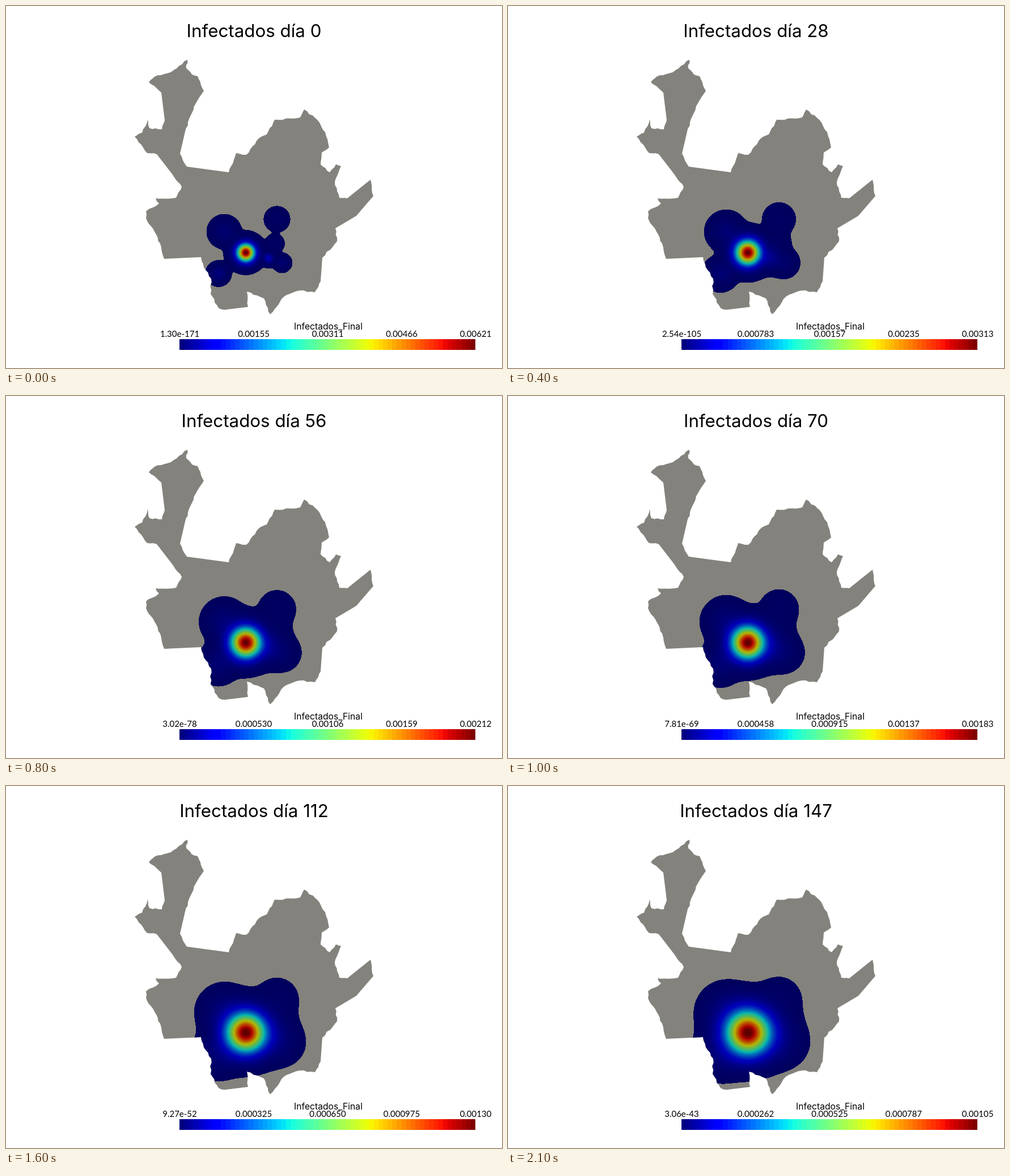
Write an HTML page with a canvas that moves like this. It is 875 by 640 pixels and loops after 2.2 s.

```html
<!DOCTYPE html>
<html lang="es">
<head>
<meta charset="utf-8">
<title>Infectados</title>
<style>
  html, body { margin: 0; width: 100%; height: 100%; overflow: hidden; background: #fff; }
  svg, canvas { position: absolute; left: 0; top: 0; display: block; }
  text { text-anchor: middle; fill: #000; font-family: Inter, sans-serif; }
  #title { font-size: 31.3px; }
  #legend { font-size: 15.7px; }
  .label { font-family: Lato, sans-serif; font-size: 15px; }
</style>
</head>
<body>
<svg id="stage" width="875" height="640" viewBox="0 0 875 640">
  <path id="region" fill="#84827c"/>
  <g id="bar" shape-rendering="crispEdges"></g>
  <text id="title" x="437.5" y="55"></text>
  <text id="legend" x="568.5" y="572">Infectados_Final</text>
</svg>
<canvas id="spread" width="875" height="640"></canvas>
<script>
const STEP_MS = 100, STEPS = 22, DAYS_PER_STEP = 7;
const BAR = { x: 306, y: 589, width: 522, height: 19, bands: 64 };
const AREA = { x: 315, y: 320, width: 235, height: 225 };
const SHADE = 0.72;          // surface lighting on the map
const DIFFUSION = 3.35;      // variance gained per day

// Main corners of the border; the short stretches between them are roughened.
const corners = `320,95 318,110 328,121 338,124 349,150 335,172 325,195 316,222 307,261 319,284
  393,294 406,260 424,263 446,234 460,227 474,201 508,199 519,197 526,183 550,202 563,223 570,250
  557,259 555,280 571,294 582,280 591,283 580,311 588,339 602,340 643,307 648,336 618,371 581,393
  584,416 558,445 555,487 545,506 518,503 490,514 466,545 455,517 425,505 427,532 386,537 375,534
  361,509 362,482 349,462 344,444 279,447 272,420 262,399 247,375 247,363 270,349 264,340 300,339
  310,320 293,297 266,262 249,260 227,231 240,224 250,200 253,216 275,218 280,202 274,153 252,135
  262,125 291,117`.trim().split(/\s+/).map(pair => pair.split(",").map(Number));

// Outbreaks: mass relative to the visible threshold, and initial variance.
const outbreaks = [
  { x: 423, y: 436, mass: 300000, variance: 100 },
  { x: 385, y: 399, mass: 8570, variance: 115 },
  { x: 478, y: 377, mass: 2250, variance: 85 },
  { x: 463, y: 446, mass: 9000, variance: 28 },
  { x: 474, y: 420, mass: 1650, variance: 45 },
  { x: 487, y: 454, mass: 3200, variance: 38 },
  { x: 375, y: 473, mass: 6800, variance: 60 },
];

// The peak thins out as the outbreak spreads over a growing surface.
const highest = day => 1 / (160.97 + 5.1 * day + 24.5 * Math.log(1 + day / 32));

// Decimal exponent of the lowest value at a few key days.
const lowestKeys = [[0, -170.886], [14, -123.593], [42, -89.0155], [70, -68.1073],
  [98, -55.5272], [126, -47.1599], [147, -42.5143]];

const $ = id => document.getElementById(id);
const clamp = v => Math.max(0, Math.min(1, v));
const ramp = (v, from, to) => clamp((v - from) / (to - from));
const jet = v => [
  ramp(v, 0.35, 0.66) - ramp(v, 0.89, 1) / 2,
  ramp(v, 0.125, 0.375) - ramp(v, 0.64, 0.91),
  0.5 + ramp(v, 0, 0.11) / 2 - ramp(v, 0.34, 0.65),
].map(c => 255 * c);

function add(parent, name, attributes) {
  const node = document.createElementNS("http://www.w3.org/2000/svg", name);
  for (const key in attributes) node.setAttribute(key, attributes[key]);
  return parent.appendChild(node);
}

// Parabola through the three knots around t.
function interpolate(knots, t) {
  const next = knots.findIndex(([x]) => x > t);
  const start = next < 0 ? knots.length - 3 : Math.min(next - 1, knots.length - 3);
  const near = knots.slice(start, start + 3);
  return near.reduce((sum, [x, y]) =>
    sum + near.reduce((term, [other]) => other === x ? term : term * (t - other) / (x - other), y), 0);
}

function randomizer(seed) {
  return () => (seed = seed * 16807 % 2147483647) / 2147483647;
}

function roughOutline(points) {
  const random = randomizer(7);
  const result = points.flatMap(([x, y], i) => {
    const [nextX, nextY] = points[(i + 1) % points.length];
    const dx = nextX - x, dy = nextY - y, length = Math.hypot(dx, dy);
    const pieces = length < 40 ? Math.ceil(length / 7) : 1;
    return Array.from({ length: pieces }, (_, k) => {
      const shift = k ? (random() - 0.5) * 2.6 / length : 0;
      return [x + dx * k / pieces - dy * shift, y + dy * k / pieces + dx * shift];
    });
  });
  return `M${result.map(p => p.map(n => n.toFixed(1)).join(",")).join(" ")}Z`;
}

const outline = roughOutline(corners);
$("region").setAttribute("d", outline);
$("spread").style.clipPath = `path("${outline}")`;
for (let i = 0; i < BAR.bands; i++) {
  const edge = n => Math.round(BAR.x + n * BAR.width / BAR.bands);
  add($("bar"), "rect", {
    x: edge(i), y: BAR.y, width: edge(i + 1) - edge(i), height: BAR.height,
    fill: `rgb(${jet(i / (BAR.bands - 1)).map(Math.round)})`,
  });
}
const labels = [0, 1, 2, 3, 4].map(i =>
  add($("stage"), "text", { class: "label", x: BAR.x + 0.5 + i * BAR.width / 4, y: 584.5 }));

const context = $("spread").getContext("2d");
const image = context.createImageData(AREA.width, AREA.height);

function drawSpread(day) {
  const sources = outbreaks.map(o => {
    const variance = o.variance + DIFFUSION * day;
    return { x: o.x, y: o.y, height: o.mass / variance, scale: -0.5 / variance };
  });
  const peak = sources[0].height;
  for (let row = 0, p = 0; row < AREA.height; row++) {
    for (let column = 0; column < AREA.width; column++, p += 4) {
      let value = 0;
      for (const s of sources) {
        const dx = AREA.x + column + 0.5 - s.x, dy = AREA.y + row + 0.5 - s.y;
        value += s.height * Math.exp((dx * dx + dy * dy) * s.scale);
      }
      image.data[p + 3] = value > 1 ? 255 : 0;
      if (value > 1) jet(clamp(value / peak)).forEach((c, i) => image.data[p + i] = c * SHADE);
    }
  }
  context.putImageData(image, AREA.x, AREA.y);
}

function draw(step) {
  const day = step * DAYS_PER_STEP;
  $("title").textContent = `Infectados día ${day}`;
  labels.forEach((label, i) => {
    label.textContent = i
      ? (highest(day) * i / 4).toPrecision(3)
      : (10 ** interpolate(lowestKeys, day)).toExponential(2);
  });
  drawSpread(day);
}

const begin = performance.now();
let shown = -1;
function tick() {
  const step = Math.floor((performance.now() - begin) / STEP_MS) % STEPS;
  if (step !== shown) draw(shown = step);
  requestAnimationFrame(tick);
}
tick();
</script>
</body>
</html>
```
